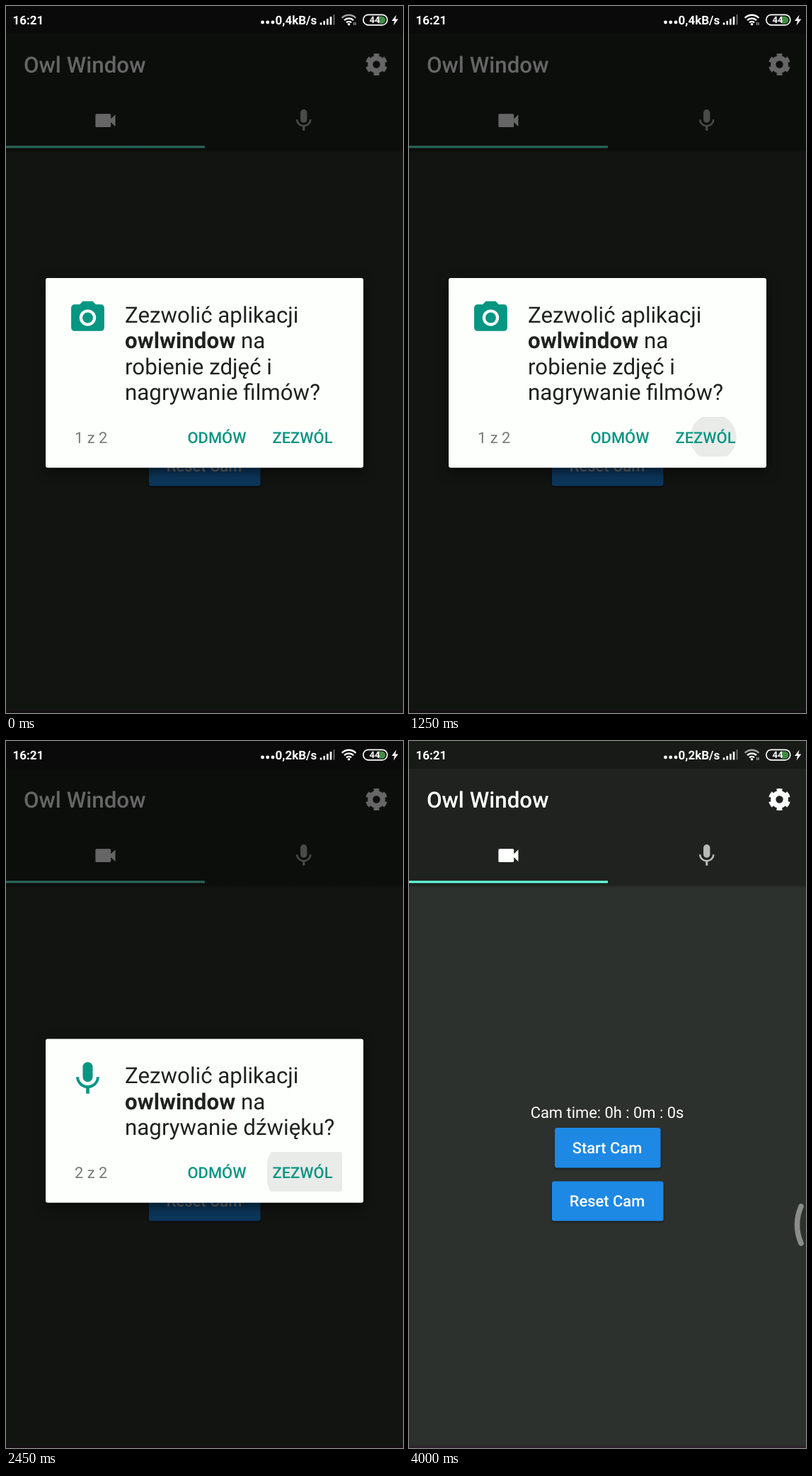
An HTML page for the animation above (4.05 s loop, 561x998 px).

```html
<!DOCTYPE html>
<html lang="pl">
<head>
<meta charset="utf-8">
<title>Permission dialogs</title>
<style>
html, body { margin: 0; width: 100%; height: 100%; overflow: hidden; background: #2d312d; }
svg { display: block; width: 561px; height: 998px; font-family: Roboto, sans-serif; text-rendering: geometricPrecision; }
.status { font-size: 17px; font-weight: 700; fill: #fff; }
.big { font-size: 31.3px; }
.small { font-size: 21.9px; }
.medium { font-weight: 500; }
.bold { font-weight: 700; }
.white { fill: #fff; }
.mid { text-anchor: middle; }
.teal { fill: #069681; }
.ink { fill: #202220; }
.line { fill: none; stroke: #fff; }
.button { fill: #1e88e5; filter: drop-shadow(0 2px 1.5px #0006); }
</style>
</head>
<body>
<svg viewBox="0 0 561 998">
  <defs>
    <path id="mic" d="M12 14a3 3 0 0 0 3-3V5a3 3 0 0 0-6 0v6a3 3 0 0 0 3 3zM17.3 11a5.3 5.1 0 0 1-10.6 0H5a7 7 0 0 0 6 6.7V21h2v-3.3a7 7 0 0 0 6-6.7z"/>
    <path id="video" d="M17 10.5V7a1 1 0 0 0-1-1H4a1 1 0 0 0-1 1v10a1 1 0 0 0 1 1h12a1 1 0 0 0 1-1v-3.5l4 4v-11z"/>
    <g id="photo">
      <path fill-rule="evenodd" d="M9 2L7.2 4H4a2 2 0 0 0-2 2v12a2 2 0 0 0 2 2h16a2 2 0 0 0 2-2V6a2 2 0 0 0-2-2h-3.2L15 2zM12 7a5 5 0 0 1 0 10a5 5 0 0 1 0-10z"/>
      <circle cx="12" cy="12" r="3.2"/>
    </g>
    <linearGradient id="shade" x2="0" y2="1">
      <stop stop-color="#000" stop-opacity=".4"/>
      <stop offset="1" stop-color="#000" stop-opacity="0"/>
    </linearGradient>
    <clipPath id="allowArea"><rect x="369" y="580" width="106" height="56" rx="3"/></clipPath>
  </defs>

  <!-- App screen -->
  <rect width="561" height="998" fill="#2d312d"/>
  <rect y="995" width="561" height="3" fill="#30242c"/>
  <rect y="201" width="561" height="7" fill="url(#shade)"/>
  <rect width="561" height="201" fill="#1f221f"/>
  <rect width="561" height="39" fill="#181a18"/>
  <text class="big medium white" x="25" y="94">Owl Window</text>
  <g class="line" transform="translate(523.5 82.5)">
    <circle r="8.8" stroke-width="7.2"/>
    <circle r="13" stroke-width="5" pathLength="12" stroke-dasharray="1.1 .9" stroke-dashoffset="-.45"/>
  </g>
  <use href="#video" class="white" transform="translate(121.7 143) scale(1.56)"/>
  <use href="#mic" fill="#b8bab8" transform="translate(402 143) scale(1.56)"/>
  <rect y="197.3" width="281" height="3.2" fill="#64ffda"/>
  <text class="small white mid" x="280" y="532">Cam time: 0h : 0m : 0s</text>
  <rect class="button" x="206" y="546" width="149.5" height="56.5" rx="3"/>
  <rect class="button" x="202" y="621.5" width="157.5" height="56" rx="3"/>
  <text class="small medium white mid" x="280" y="582">Start Cam</text>
  <text class="small medium white mid" x="280" y="657">Reset Cam</text>
  <path id="edge" d="M554 657Q543 683 554 709" fill="none" stroke="#8b8d8b" stroke-width="7.5" stroke-linecap="round"/>

  <rect id="dim" width="561" height="998" opacity=".6"/>

  <!-- Status bar -->
  <text class="status" x="9.5" y="25.7">16:21</text>
  <g class="white">
    <circle cx="362.5" cy="23" r="2.4"/><circle cx="369.7" cy="23" r="2.4"/><circle cx="377" cy="23" r="2.4"/>
  </g>
  <text class="status" id="speed" x="380.5" y="25.7"></text>
  <g class="line" stroke-width="2.6">
    <path d="M445 26.5v-3M449.7 26.5v-5.5M454.3 26.5v-8.5M459 26.5v-11.5"/>
    <path d="M463.5 26.5v-14.5" stroke-width="1.6" opacity=".45"/>
    <path id="wave" d="M474.7 16.8a13.8 13.8 0 0 1 19.6 0" stroke-width="2.4"/>
    <path d="M478 20.2a9.2 9.2 0 0 1 13 0M481 23.4a5 5 0 0 1 7 0" stroke-width="2.4"/>
    <path id="traffic" d="M491.7 23v4M494 23v4" stroke-width="1"/>
  </g>
  <circle class="white" cx="484.5" cy="25.8" r="1.8"/>
  <path d="M527 14.5h4a5.3 5.3 0 0 1 0 10.6h-4z" fill="#438a43"/>
  <rect class="line" x="504.8" y="12.3" width="34" height="14.6" rx="7.3" stroke-width="1.7"/>
  <text class="status mid" x="521" y="24.3" style="font-size:13px">44</text>
  <path class="white" d="M551.5 12.5l-6.5 8.5h4l-1.5 6.5 6.8-9h-4.1z"/>

  <!-- Permission dialog -->
  <g id="dialog">
    <rect id="card" x="56" width="449" rx="3" fill="#fdfffd" style="filter:drop-shadow(0 6px 8px #0008)"/>
    <g clip-path="url(#allowArea)"><circle id="ripple" cx="430" cy="609"/></g>
    <use id="icon" class="teal"/>
    <text class="big ink" id="message"></text>
    <text class="small" id="page" x="97" y="617" fill="#777977"></text>
    <text class="small medium teal" x="256.5" y="617">ODMÓW</text>
    <text class="small medium teal" x="376.5" y="617">ZEZWÓL</text>
  </g>
</svg>
<script>
const LOOP = 4050, SWAP = 1450, LEAVE = 2550, GONE = 2720;
const BOTTOM = 651.7, LINE = 36.5;
const APP = '<tspan class="bold">owlwindow</tspan> na';
const dialogs = [
  { top: 384, icon: '#photo', page: '1 z 2', lines: ['Zezwolić aplikacji', APP, 'robienie zdjęć i', 'nagrywanie filmów?'] },
  { top: 384 + LINE, icon: '#mic', page: '2 z 2', lines: ['Zezwolić aplikacji', APP, 'nagrywanie dźwięku?'] }
];
const $ = id => document.getElementById(id);
const set = (id, attrs) => Object.entries(attrs).forEach(([k, v]) => $(id).setAttribute(k, v));
const ramp = (t, a, b) => Math.min(1, Math.max(0, (t - a) / (b - a)));
let shown;

function showDialog(d) {
  if (shown === d) return;
  shown = d;
  set('card', { y: d.top, height: BOTTOM - d.top });
  set('icon', { href: d.icon, transform: `translate(87.4 ${d.top + 28}) scale(2.34)` });
  $('page').textContent = d.page;
  $('message').innerHTML = d.lines
    .map((s, i) => `<tspan x="168" y="${d.top + 62.5 + i * LINE}">${s}</tspan>`).join('');
}

function draw(t) {
  showDialog(dialogs[t < SWAP ? 0 : 1]);
  const visible = 1 - ramp(t, LEAVE, GONE);
  set('dialog', { opacity: visible });
  set('dim', { opacity: 0.6 * visible });

  // Touch ripple: spreads from the tap, then fades
  const tap = t < 2000 ? 1200 : 2280;
  const spread = t - tap;
  set('ripple', {
    r: spread < 0 ? 0 : Math.min(75, 20 + spread * 0.25),
    opacity: 0.078 * (1 - ramp(spread, 220, 340))
  });

  const slide = 1 - ramp(t, 3100, 3250);
  set('edge', { transform: `translate(${20 * slide})`, opacity: 1 - slide });

  $('speed').textContent = t < 2250 ? '0,4kB/s' : '0,2kB/s';
  set('wave', { opacity: t < 600 || t >= 3300 ? 0.6 : 1 });
  set('traffic', { opacity: t < 2250 || t >= 3350 ? 0.8 : 0 });
}

const start = performance.now();
function tick() {
  draw((performance.now() - start) % LOOP);
  requestAnimationFrame(tick);
}
tick();
</script>
</body>
</html>
```
